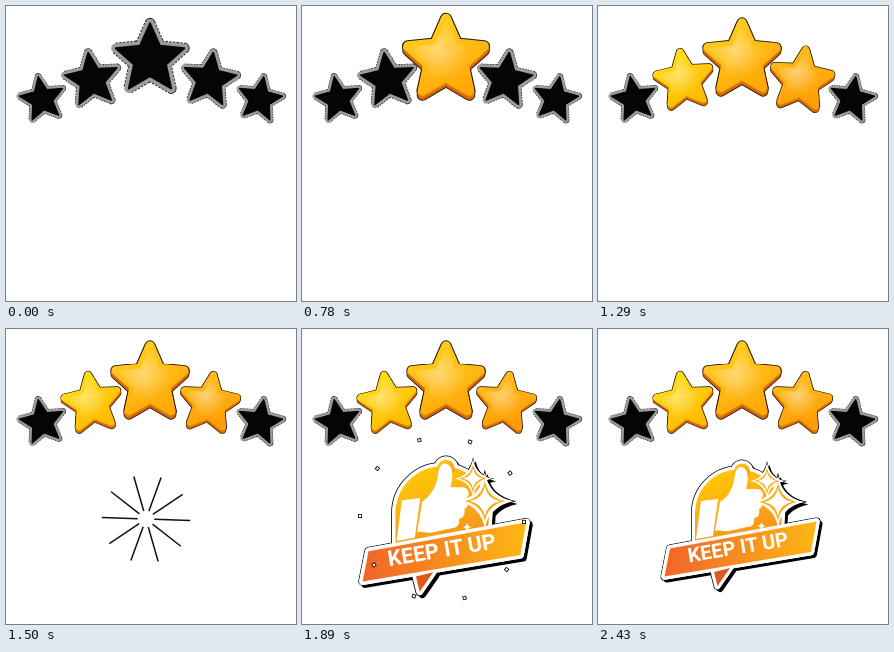
These frames come from a looping animation (290x295 px, 4.5 s). An HTML page:

```html
<!DOCTYPE html>
<html lang="en">
<head>
<meta charset="utf-8">
<title>Keep it up</title>
<style>
  html, body { margin: 0; width: 100%; height: 100%; overflow: hidden; background: #fff; }
  svg { display: block; width: 100vw; height: 100vh; }
  text { font: bold 20px Roboto, sans-serif; fill: #fff; text-anchor: middle; }
  .join { stroke-linejoin: round; }
</style>
</head>
<body>
<svg viewBox="0 0 290 295">
  <defs>
    <radialGradient id="shine" cx=".4" cy=".42" r=".42">
      <stop offset="0" stop-color="#fff" stop-opacity=".4"/>
      <stop offset="1" stop-color="#fff" stop-opacity="0"/>
    </radialGradient>
    <linearGradient id="domeFill" x1=".25" y1="0" x2=".75" y2="1">
      <stop offset="0" stop-color="#ffc907"/>
      <stop offset="1" stop-color="#f7901e"/>
    </linearGradient>
    <linearGradient id="ribbonFill">
      <stop offset="0" stop-color="#f2642a"/>
      <stop offset="1" stop-color="#fdb713"/>
    </linearGradient>
    <path id="star"/>
    <g id="dome">
      <path d="M97 212 L97 184 A43.5 43.5 0 0 1 184 184 L183 200 Z"/>
      <circle cx="144" cy="142.5" r="8"/>
    </g>
    <path id="ribbon" d="M72 219.5 L218.5 192.5 L213 223 L66.5 247.5 Z"/>
    <path id="tail" d="M116 243 L132 239 L119.5 257 Z"/>
    <path id="spark" d="M0 -1 Q.16 -.16 1 0 Q.16 .16 0 1 Q-.16 .16 -1 0 Q-.16 -.16 0 -1Z"/>
    <g id="shape" class="join">
      <use href="#dome"/><use href="#ribbon"/><use href="#tail"/>
    </g>
  </defs>
  <g id="stars"></g>
  <g id="badge">
    <g id="shade" transform="translate(2.5 2.5)">
      <use href="#shape" stroke="#000" stroke-width="7"/>
    </g>
    <use href="#shape" stroke="#000" stroke-width="8"/>
    <g id="sparkEdge"></g>
    <use href="#shape" fill="#fff" stroke="#fff" stroke-width="6.5"/>
    <g id="sparkRim"></g>
    <use href="#dome" fill="url(#domeFill)"/>
    <g fill="#fff">
      <path d="M103 172 L120 170 L115 207 L98 210 Z"/>
      <path d="M122 173 C129 169 134 161 136 152 C137 144 138 138 143 138 C151 139 151 150 148 160
        L160 160 C166 161 166 168 163 170 C166 174 164 179 161 180 C162 185 160 189 156 189
        C157 195 154 198 149 198 L131 202 C124 203 121 200 117 202 Z"/>
    </g>
    <g id="sparks"></g>
    <use href="#ribbon" class="join" fill="none" stroke="#fff" stroke-width="6.5"/>
    <use href="#tail" fill="#dd5a1e"/>
    <use href="#ribbon" fill="url(#ribbonFill)"/>
    <text transform="translate(141 225) rotate(-9.5)">KEEP IT UP</text>
  </g>
  <g id="rays"></g>
</svg>
<script>
const LOOP = 4500;
const $ = id => document.getElementById(id);
const add = (id, html) => $(id).insertAdjacentHTML('beforeend', html);
const clamp = v => Math.min(1, Math.max(0, v));
const lerp = (a, b, p) => a + (b - a) * p;

const tips = Array.from({ length: 10 }, (_, i) => {
  const r = i % 2 ? 16.8 : 36, a = i * Math.PI / 5;
  return [r * Math.sin(a), -r * Math.cos(a)].map(v => v.toFixed(2));
});
$('star').setAttribute('d', `M${tips.join('L')}Z`);

const layer = (fill, width, y = 0, more = '') =>
  `<use href="#star" class="join" y="${y}" fill="${fill}" stroke="${fill}" stroke-width="${width}" ${more}/>`;

// x, y, outer radius, tilt, pop start, light and dark gold
const stars = [
  [36.2, 93.3, 26.5, -10],
  [253.8, 93.3, 26.5, 10],
  [86, 74, 32, -8, 840, '#ffe01a', '#ffba02'],
  [203.5, 74, 32, 8, 1080, '#ffbe1c', '#ff9d04'],
  [144, 53.3, 41.5, 0, 600, '#ffd021', '#ffa808']
];
const golds = [];
stars.forEach(([x, y, r, tilt, start, light, dark], i) => {
  let html = layer('#222', 11, 0, 'stroke-dasharray="2.5 1.2"')
    + layer('#9c9c9c', 9.2) + layer('#050505', 2);
  if (start) html += `<linearGradient id="gold${i}" x1=".2" y1="0" x2=".7" y2="1">
      <stop offset="0" stop-color="${light}"/><stop offset="1" stop-color="${dark}"/></linearGradient>
    <g class="gold">${layer('#2a1500', 11, -.5)}${layer('#2a1500', 10.5, 3)}
    ${layer('#c9620b', 9, 3)}${layer('#dd7a0c', 9, 1)}${layer(`url(#gold${i})`, 8.8, -.7)}
    <use href="#star" fill="url(#shine)"/></g>`;
  add('stars', `<g transform="translate(${x} ${y}) rotate(${tilt}) scale(${r / 41.5})">${html}</g>`);
  if (start) golds.push([$('stars').lastElementChild.querySelector('.gold'), start]);
});

// Sparkles: shadow, dark edge, white rim, gold line, white core
for (const [x, y, r] of [[180, 173, 14], [169, 152, 9.5], [163.5, 197, 4]]) {
  const spark = (fill, grow) =>
    `<use href="#spark" fill="${fill}" transform="translate(${x} ${y}) scale(${r * grow})"/>`;
  if (r > 5) {
    add('shade', spark('#000', 2));
    add('sparkEdge', spark('#000', 2.1));
    add('sparkRim', spark('#fff', 1.9));
    add('sparks', spark('#fff', 1.8) + spark('#fbab18', 1.35));
  }
  add('sparks', spark('#fff', 1));
}

for (let i = 0; i < 10; i++) add('rays',
  `<g transform="translate(140 190) rotate(${2 + 36 * i})"><path stroke="#111"/><path stroke="#fff"/></g>`);
const rays = [...$('rays').children];

// Grow past full size, then settle
function pop(t, start, length) {
  const u = clamp((t - start) / length), peak = .55;
  return u < peak ? 1.15 * Math.sin(u / peak * Math.PI / 2)
    : lerp(1.15, 1, (u - peak) / (1 - peak));
}

// Value at t along [time, value] points
function track(t, points) {
  let [t0, v0] = points[0];
  for (const [t1, v1] of points) {
    if (t < t1) return t1 === t0 ? v0 : lerp(v0, v1, clamp((t - t0) / (t1 - t0)));
    [t0, v0] = [t1, v1];
  }
  return v0;
}
const HEAD = [[1410, 6], [1500, 44], [1650, 79], [1890, 84], [2040, 86], [2190, 87]];
const TAIL = [[1410, 6], [1500, 8], [1650, 50], [1890, 80], [2040, 84], [2190, 87]];
const WIDTH = [[1410, 1.3], [1500, 1.5], [1890, 4], [2040, 1.6], [2190, 0]];

function draw(t) {
  for (const [el, start] of golds) {
    const s = pop(t, start, 270);
    el.style.display = s > 0 ? '' : 'none';
    el.setAttribute('transform', `scale(${s})`);
  }

  const s = pop(t, 1560, 430);
  $('badge').style.display = s > 0 ? '' : 'none';
  $('badge').setAttribute('transform',
    `translate(143 183) scale(${s}) translate(-143 -183)`);

  $('rays').style.display = t > 1410 && t < 2190 ? '' : 'none';
  const head = track(t, HEAD), tail = track(t, TAIL), w = track(t, WIDTH);
  const core = Math.max(0, w - 1.8);
  for (const ray of rays) {
    const [edge, fill] = ray.children;
    edge.setAttribute('d', `M${tail} 0H${head}`);
    edge.setAttribute('stroke-width', w);
    fill.setAttribute('d', `M${tail + .9} 0H${Math.max(tail + .9, head - .9)}`);
    fill.setAttribute('stroke-width', core);
  }
}

const begin = performance.now();
function tick() {
  draw((performance.now() - begin) % LOOP);
  requestAnimationFrame(tick);
}
tick();
</script>
</body>
</html>
```
